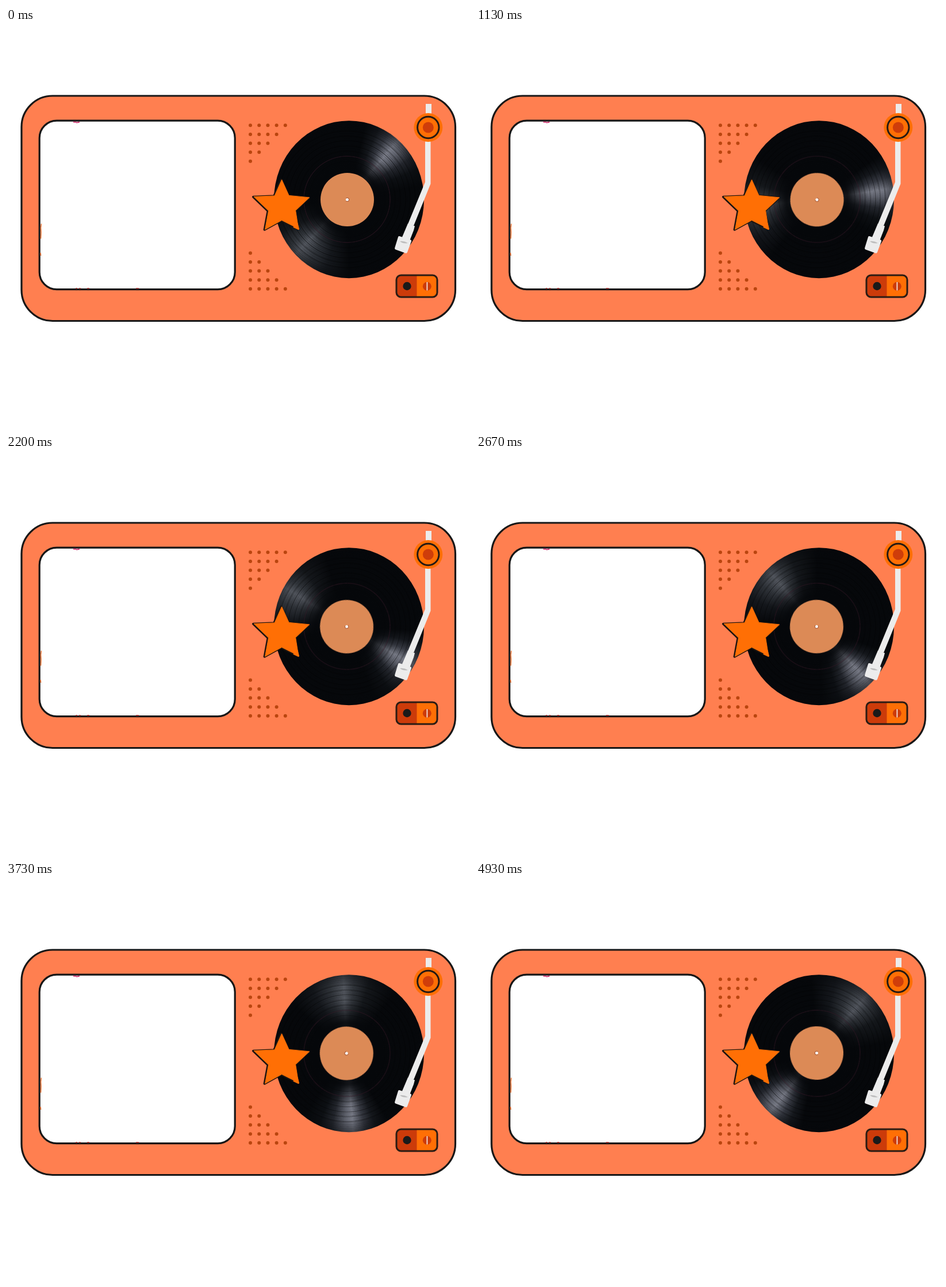
Write an HTML page that moves like this. It is 807 px wide and 694 px high and loops after 4.99 s.

```html
<!DOCTYPE html>
<html lang="en">
<head>
<meta charset="utf-8">
<title>Record player</title>
<style>
  html, body { margin: 0; width: 100%; height: 100%; overflow: hidden; background: #fff; }
  svg, .disc { position: absolute; left: 0; top: 0; }
  svg { width: 807px; height: 694px; }

  .disc { width: 807px; height: 694px; clip-path: ellipse(130.5px 137px at 596.5px 298.2px); }
  .vinyl {
    position: absolute; left: 443px; top: 148px; width: 300px; height: 300px;
    border-radius: 50%;
    /* edge and centre shading, inner ring, track gaps, fine grooves, light */
    background:
      radial-gradient(circle closest-side, #05070ae0 54px, #05070aa0 64px, #05070a55 76px, #05070a00 92px, #05070a00 116px, #05070a70 136px),
      radial-gradient(circle closest-side, #0000 74px, #4a1f3280 74.6px 75.4px, #0000 76px),
      radial-gradient(circle closest-side,
        #0000 65px, #0006 66px, #0000 67px 83px, #0007 84px, #0000 85px 92px, #0007 93px,
        #0000 94px 101px, #0007 102px, #0000 103px 109px, #0007 110px, #0000 111px 118px,
        #0007 119px, #0000 120px),
      repeating-radial-gradient(circle, #0000 0 1.6px, #0002 2.4px 3.2px),
      conic-gradient(#06080b 14deg, #15181d 24deg, #363942 32deg, #7b7e8a 41deg, #60636e 47deg,
        #24272e 57deg, #0d1014 67deg, #06080b 80deg 178deg, #15181d 197deg, #2f3339 211deg,
        #53575f 223deg, #32363c 231deg, #15181c 243deg, #06080b 264deg);
    animation: spin 4990ms steps(75) -3ms infinite;
  }
  .label {
    position: absolute; left: 103.5px; top: 103.5px; width: 93px; height: 93px;
    border-radius: 50%; background: #dc8a56;
  }
  .label::after {
    content: ""; position: absolute; left: 43px; top: 43px; width: 5px; height: 5px;
    border: 1px solid #a4502c; border-left-color: #dc8a56; border-radius: 50%; background: #fff;
  }
  @keyframes spin { to { transform: rotate(180deg); } }
</style>
</head>
<body>
<svg viewBox="0 0 807 694">
  <g stroke="#171717" stroke-width="3.2">
    <rect x="27" y="118" width="754.5" height="391.5" rx="54" fill="#ff7f50"/>
    <rect x="58.2" y="161.2" width="340" height="293.5" rx="30" fill="#fff"/>
  </g>
  <g fill="none" stroke-width="1.6">
    <path d="M117 163.6h4l2 1 5-1" stroke="#c92a68"/>
    <path d="M61.5 340.5l-1 7 .5 8-.5 11M60 391l.6 5" stroke="#f0702f"/>
    <path d="M121 453h3M127 453h3M141 453h4M226 453h5" stroke="#a52a2a"/>
  </g>
  <g id="dots" fill="#b9450f"></g>
</svg>

<div class="disc"><div class="vinyl"><div class="label"></div></div></div>

<svg viewBox="0 0 807 694">
  <defs>
    <path id="star" stroke-linejoin="round"
      d="M479 264L491.5 291.5L527 295L503 317.5L508 349L479 334.5L450 350.5L456 318L430.5 293.5L466.5 292Z"/>
  </defs>
  <use href="#star" x="-.4" y=".2" fill="#1d1510" stroke="#1d1510" stroke-width="4"/>
  <use href="#star" x=".6" y="-.1" fill="#ff6f05" stroke="#ff6f05" stroke-width="1"/>
  <path d="M506 340L508.5 349.5L500 345.5" fill="none" stroke="#ff6f05" stroke-width="3" stroke-linejoin="round"/>

  <g fill="#ececec">
    <path d="M730 132h10v20h-10z"/>
    <path d="M729 194h9.5v77L709 344L699 341L729 268Z"/>
    <path d="M699 340L711 344.5L709 352L702 370L688 366Z"/>
    <path d="M684 362L704 368.5Q705.500 369 705 371L698 390Q697 392.500 694.500 391.500L678 385.500Q675.500 384.500 676.300 382L682 363.500Q682.500 361.500 684 362Z"/>
  </g>
  <path d="M685 371Q691 376 699 374Q692 370 685 371Z" fill="#bdbdbd"/>

  <circle cx="734.3" cy="173" r="25" fill="#ff6f05"/>
  <circle cx="734.3" cy="173" r="18.700" fill="#ff6f05" stroke="#241a14" stroke-width="3"/>
  <circle cx="734.3" cy="173" r="9.500" fill="#cf3d0a"/>

  <rect x="679" y="430" width="71" height="38" rx="8" fill="#ff6f05"/>
  <path d="M714.500 430H687a8 8 0 0 0-8 8v22a8 8 0 0 0 8 8h27.500z" fill="#cc3b0a"/>
  <rect x="679" y="430" width="71" height="38" rx="8" fill="none" stroke="#2a1c14" stroke-width="3"/>
  <circle cx="697.500" cy="449" r="7.200" fill="#1a1a1a"/>
  <circle cx="732.300" cy="449.300" r="7.500" fill="#cc3b0a"/>
  <path d="M732.400 442v14.500" stroke="#f4e6df" stroke-width="1.800"/>
</svg>

<script>
  // Two triangular speaker grilles, one the mirror of the other
  const dots = document.getElementById("dots");
  const addDot = (x, y) => {
    const dot = document.createElementNS("http://www.w3.org/2000/svg", "circle");
    dot.setAttribute("cx", x);
    dot.setAttribute("cy", y);
    dot.setAttribute("r", 3);
    dots.append(dot);
  };
  for (let row = 0; row < 5; row++) {
    for (let col = 0; col < 5 - row; col++) {
      const x = 425 + col * 15.2;
      addDot(x, 169.300 + row * 15.600);
      addDot(x, 453.800 - row * 15.600);
    }
  }
</script>
</body>
</html>
```
